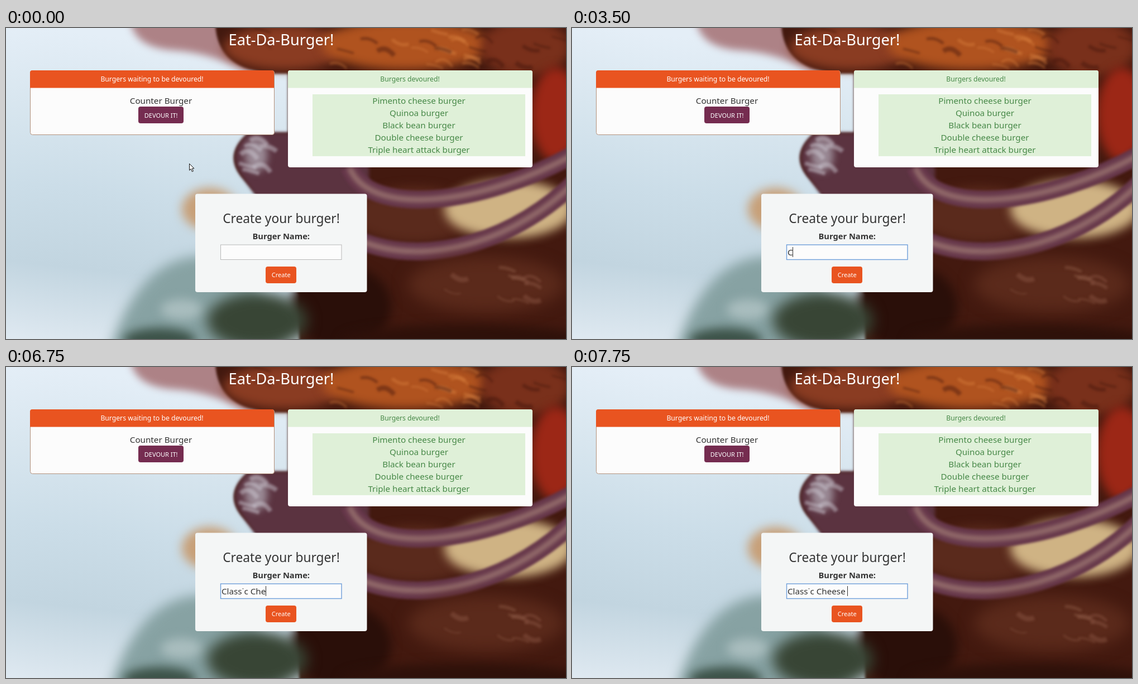
An HTML page with a canvas that plays this animation: 1003 px wide and 558 px high, repeating every 8 s.

```html
<!DOCTYPE html>
<html lang="en">
<head>
<meta charset="utf-8">
<title>Eat-Da-Burger!</title>
<style>
  html, body { margin: 0; width: 100%; height: 100%; overflow: hidden; }
  canvas, svg { position: absolute; left: 0; top: 0; width: 1003px; height: 558px; }
  text { font: 15.2px "Noto Sans", "Open Sans", sans-serif; fill: #333; text-anchor: middle; white-space: pre; }
  .title { font-size: 27.2px; fill: #fff; }
  .head { font-size: 12.2px; }
  .button { font-size: 11px; }
  .light { fill: #fff; }
  .done text { fill: #468847; }
  #typed { text-anchor: start; }
</style>
</head>
<body>
<canvas id="photo" width="1003" height="558"></canvas>
<svg viewBox="0 0 1003 558">
  <text class="title" x="493" y="31">Eat-Da-Burger!</text>

  <rect x="43.5" y="76.5" width="437" height="115" rx="4" fill="#fcfcfc" stroke="#b3917c"/>
  <path d="M43 107.5V80q0-4 4-4H476q4 0 4 4V107.5z" fill="#e95420"/>
  <text class="head light" x="261.5" y="95.5">Burgers waiting to be devoured!</text>
  <text x="277.5" y="136">Counter Burger</text>
  <rect x="237" y="141" width="81" height="30" rx="4" fill="#752c50"/>
  <text class="button light" x="277.7" y="160.5">DEVOUR IT!</text>

  <g class="done" id="devoured">
    <rect x="505" y="76" width="438" height="174" rx="4" fill="#fcfcfc"/>
    <path d="M505 107.5V80q0-4 4-4H939q4 0 4 4V107.5z" fill="#dff0d8"/>
    <rect x="549" y="119" width="381" height="111" fill="#dff0d8"/>
    <text class="head" x="723.5" y="95.5">Burgers devoured!</text>
  </g>

  <rect x="339" y="297.5" width="307.5" height="176.5" rx="4" fill="#f4f6f6"/>
  <text x="493" y="350" style="font-size:22.7px">Create your burger!</text>
  <text x="492.7" y="379" style="font-size:14.7px;font-weight:700">Burger Name:</text>
  <rect id="field" x="384.5" y="389" width="216.5" height="26.5" fill="#fcfcfc"/>
  <text id="typed" x="386" y="408"></text>
  <rect id="smudge" x="423" y="399" width="3.6" height="10" fill="#fcfcfc"/>
  <rect id="caret" y="393" width="1" height="18" fill="#333"/>
  <rect x="465" y="428" width="55" height="30" rx="4" fill="#e95420"/>
  <text class="button light" x="492.7" y="447">Create</text>

  <path id="pointer" d="M.5 .5V12.3L3.2 9.8 5.3 14.7 7.4 13.8 5.3 9H9z" fill="#fff" stroke="#111"/>
</svg>
<script>
const byId = id => document.getElementById(id);
const ctx = byId('photo').getContext('2d');

function shape(color, blur, outline) {
  ctx.filter = `blur(${blur}px)`;
  ctx.fillStyle = color;
  ctx.fill(new Path2D(outline));
}

function band(color, blur, width, course) {
  ctx.filter = `blur(${blur}px)`;
  ctx.strokeStyle = color;
  ctx.lineWidth = width;
  ctx.stroke(new Path2D(course));
}

function glow(color, x, y, rx, ry, blur = 9) {
  ctx.filter = `blur(${blur}px)`;
  ctx.fillStyle = color;
  ctx.beginPath();
  ctx.ellipse(x, y, rx, ry, 0, 0, 7);
  ctx.fill();
}

let seed = 7;
const random = () => (seed = seed * 16807 % 2147483647) / 2147483647;

// Short wavy streaks scattered over an area.
function streaks(color, count, x, y, w, h) {
  for (let i = 0; i < count; i++) {
    const sx = x + random() * w, sy = y + random() * h, bend = random() * 30 - 15;
    band(color, 2, 2 + random() * 7, `M${sx} ${sy}q15 ${bend} 30 8`);
  }
}

function drawPhoto() {
  const sky = ctx.createLinearGradient(60, 0, 0, 558);
  ['#e4eef7', '#d8e6ef', '#cbdde8', '#c2d5e0', '#dfe9f1'].forEach((c, i) => sky.addColorStop(i / 4, c));
  ctx.fillStyle = sky;
  ctx.fillRect(0, 0, 1003, 558);

  shape('#ad8286', 7, 'M222 -20Q225 35 300 40T440 85V-20z');
  glow('#c79f77', 365, 325, 50, 38);
  shape('#43190f', 2, 'M375 -20Q370 75 480 82H505V188H435Q390 225 420 265L450 300 525 480V580H1030V-20z');

  // bacon
  glow('#8a3c22', 500, 35, 110, 40);
  glow('#b0531f', 715, 30, 150, 45);
  glow('#79301b', 930, 35, 80, 50);
  streaks('#d9803f70', 14, 580, 0, 260, 70);
  streaks('#43160c70', 14, 400, 0, 580, 70);
  glow('#9c2716', 985, 155, 45, 85);

  // meat edge
  shape('#5b3340', 3, 'M435 188Q392 225 422 265L450 305H650V188z');
  glow('#9b8b96', 448, 228, 20, 30, 7);
  streaks('#c9c3cd80', 7, 415, 200, 45, 55);

  // cheese and onion
  glow('#5a2a1c', 730, 335, 110, 50);
  glow('#cfb384', 900, 325, 115, 52);
  for (const course of ['M615 250C650 340 850 320 1020 225', 'M630 380C760 435 920 375 1020 275']) {
    band('#66374a', 2, 32, course);
    band('#9a7470', 4, 9, course);
  }

  // beef
  glow('#2a0f09', 600, 500, 90, 75);
  glow('#5b2a1b', 860, 460, 140, 50, 14);
  streaks('#96614d60', 10, 760, 420, 190, 70);
  glow('#2e110a', 820, 560, 220, 28);

  // lettuce
  shape('#87a2a3', 11, 'M185 580Q235 420 340 410T500 580z');
  glow('#a9bdbe', 315, 505, 38, 18);
  glow('#3c5248', 275, 560, 65, 22);
  glow('#384535', 450, 525, 90, 50, 12);
}

function listDevoured() {
  const lines = ['Pimento cheese burger', 'Quinoa burger', 'Black bean burger', 'Double cheese burger',
    'Triple heart attack burger'];
  lines.forEach((line, i) => {
    const text = document.createElementNS('http://www.w3.org/2000/svg', 'text');
    text.setAttribute('x', 739.5);
    text.setAttribute('y', 136 + 22 * i);
    text.textContent = line;
    byId('devoured').append(text);
  });
}

const LOOP = 8000, TICK = 250, BLINK = 500;
const FOCUS = 1250, TYPING = 3500, POINTER_GONE = 750;
// Letters arriving at each tick while typing.
const RHYTHM = 'C||la|s|s||ic| ||||Ch||e|e|s|e| '.split('|');

const show = (el, on) => el.setAttribute('visibility', on ? 'visible' : 'hidden');

function movePointer(t) {
  const k = Math.floor(t / TICK);
  byId('pointer').setAttribute('transform', `translate(${328 + k * (62 - 9 * k)} ${243 + k * (58 + 5 * k)})`);
  show(byId('pointer'), t < POINTER_GONE);
}

function type(t) {
  const focused = t >= FOCUS;
  const field = byId('field');
  field.setAttribute('stroke', focused ? '#6f9fda' : '#b9b9b9');
  field.setAttribute('stroke-width', focused ? 1.4 : 1);

  const ticks = RHYTHM.slice(0, Math.max(0, Math.floor((t - TYPING) / TICK) + 1));
  const typed = byId('typed'), caret = byId('caret');
  typed.textContent = ticks.join('');
  show(byId('smudge'), typed.textContent.includes('i'));

  const lastKey = ticks.findLastIndex(letters => letters);
  const lastChange = lastKey < 0 ? FOCUS : TYPING + lastKey * TICK;
  const width = ticks.length ? typed.getComputedTextLength() : 0;
  caret.setAttribute('x', Math.floor(386 + width));
  show(caret, focused && Math.floor((t - lastChange) / BLINK) % 2 === 0);
}

drawPhoto();
listDevoured();
const start = performance.now();
function tick() {
  const t = (performance.now() - start) % LOOP;
  movePointer(t);
  type(t);
  requestAnimationFrame(tick);
}
tick();
</script>
</body>
</html>
```
